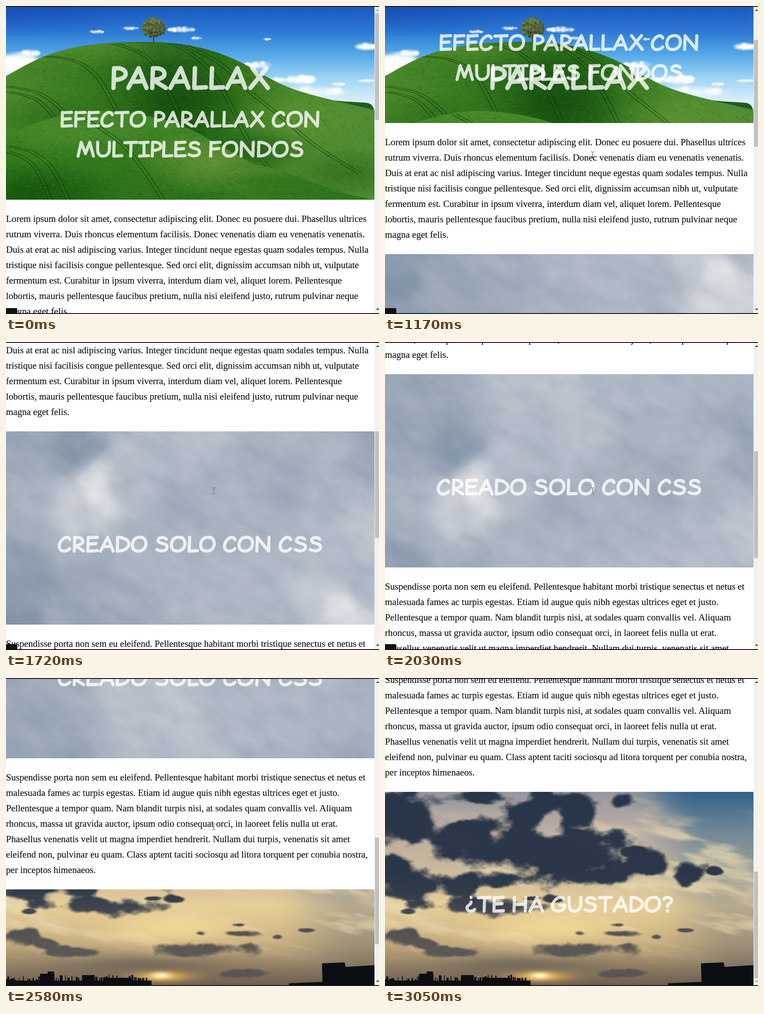
Recreate the animation shown at these times as an HTML page with a canvas. Size 825x679 px, loop 3910 ms.

```html
<!DOCTYPE html>
<html lang="es">
<head>
<meta charset="utf-8">
<title>Parallax</title>
<style>
html, body { margin: 0; width: 100%; height: 100%; overflow: hidden; background: #fff; }
canvas { position: absolute; left: 0; top: 0; }
#view { position: absolute; left: 0; top: 2px; width: 815px; height: 675px; overflow: hidden; }
#page { position: absolute; left: 0; top: -2px; }
p {
  position: absolute; left: 0; margin: 0; white-space: pre; color: #151515;
  font: 20.6px/34px "Liberation Serif", "Times New Roman", serif;
  -webkit-text-stroke: .2px #151515;
}
#tab { position: absolute; left: 0; top: 666px; width: 25px; height: 13px; background: #101113; border-radius: 0 3px 0 0; }
</style>
</head>
<body>
<canvas id="stage" width="825" height="679" aria-label="PARALLAX. EFECTO PARALLAX CON MULTIPLES FONDOS. CREADO SOLO CON CSS. ¿TE HA GUSTADO?"></canvas>
<div id="view"><div id="page">
<p style="top:452px">Lorem ipsum dolor sit amet, consectetur adipiscing elit. Donec eu posuere dui. Phasellus ultrices
rutrum viverra. Duis rhoncus elementum facilisis. Donec venenatis diam eu venenatis venenatis.
Duis at erat ac nisl adipiscing varius. Integer tincidunt neque egestas quam sodales tempus. Nulla
tristique nisi facilisis congue pellentesque. Sed orci elit, dignissim accumsan nibh ut, vulputate
fermentum est. Curabitur in ipsum viverra, interdum diam vel, aliquet lorem. Pellentesque
lobortis, mauris pellentesque faucibus pretium, nulla nisi eleifend justo, rutrum pulvinar neque
magna eget felis.</p>
<p style="top:1167px">Suspendisse porta non sem eu eleifend. Pellentesque habitant morbi tristique senectus et netus et
malesuada fames ac turpis egestas. Etiam id augue quis nibh egestas ultrices eget et justo.
Pellentesque a tempor quam. Nam blandit turpis nisi, at sodales quam convallis vel. Aliquam
rhoncus, massa ut gravida auctor, ipsum odio consequat orci, in laoreet felis nulla ut erat.
Phasellus venenatis velit ut magna imperdiet hendrerit. Nullam dui turpis, venenatis sit amet
eleifend non, pulvinar eu quam. Class aptent taciti sociosqu ad litora torquent per conubia nostra,
per inceptos himenaeos.</p>
</div></div>
<div id="tab"></div>
<script>
const W = 815, H = 679, LOOP = 3910;
const ctx = document.getElementById('stage').getContext('2d');
const page = document.getElementById('page');

// ---------- helpers ----------
let seed = 7;
const rnd = () => (seed = (seed * 16807) % 2147483647) / 2147483647;
const lerp = (a, b, k) => a + (b - a) * k;
const mix = (a, b, k) => a.map((v, i) => lerp(v, b[i], k));
const smooth = (a, b, v) => { const k = Math.min(1, Math.max(0, (v - a) / (b - a))); return k * k * (3 - 2 * k); };

function hash(x, y) {
  let n = Math.imul(x, 374761393) ^ Math.imul(y, 668265263);
  n = Math.imul(n ^ (n >>> 13), 1274126177);
  return ((n ^ (n >>> 16)) >>> 0) / 4294967296;
}
function noise(x, y) {
  const i = Math.floor(x), j = Math.floor(y), u = smooth(0, 1, x - i), v = smooth(0, 1, y - j);
  return lerp(lerp(hash(i, j), hash(i + 1, j), u), lerp(hash(i, j + 1), hash(i + 1, j + 1), u), v);
}
function fbm(x, y, n = 5) {
  let sum = 0, amp = .5;
  for (; n--; amp /= 2) { sum += amp * noise(x, y); x = x * 2 + 17; y = y * 2 + 31; }
  return sum;
}
function layer(w = W, h = H) {
  const c = document.createElement('canvas');
  c.width = w; c.height = h;
  return c;
}
// Builds a picture from a colour function, at half resolution
function field(shade) {
  const w = W + 1 >> 1, h = H + 1 >> 1, small = layer(w, h), sg = small.getContext('2d'), img = sg.createImageData(w, h);
  for (let y = 0, i = 0; y < h; y++) for (let x = 0; x < w; x++, i += 4) {
    const c = shade(x * 2, y * 2);
    for (let k = 0; k < 3; k++) img.data[i + k] = c[k];
    img.data[i + 3] = 255;
  }
  sg.putImageData(img, 0, 0);
  const big = layer(), g = big.getContext('2d');
  g.imageSmoothingQuality = 'high';
  g.drawImage(small, 0, 0, w * 2, h * 2);
  return big;
}
function curve(g, text) {
  const p = text.split(' ').map(s => s.split(',').map(Number));
  g.moveTo(...p[0]);
  for (let i = 1; i < p.length - 1; i++) {
    const last = i === p.length - 2, [x, y] = p[i], [u, v] = p[i + 1];
    g.quadraticCurveTo(x, y, last ? u : (x + u) / 2, last ? v : (y + v) / 2);
  }
}
// Soft elliptical spot; rgb as "r,g,b"
function spot(g, x, y, rx, ry, rgb, a) {
  g.save();
  g.translate(x, y);
  g.scale(rx, ry);
  const f = g.createRadialGradient(0, 0, 0, 0, 0, 1);
  f.addColorStop(0, `rgba(${rgb},${a})`);
  f.addColorStop(.5, `rgba(${rgb},${a * .55})`);
  f.addColorStop(1, `rgba(${rgb},0)`);
  g.fillStyle = f;
  g.fillRect(-1, -1, 2, 2);
  g.restore();
}
function ramp(g, x, y, stops) {
  const f = g.createLinearGradient(0, 0, x, y);
  stops.forEach(([k, c]) => f.addColorStop(k, c));
  return f;
}

// ---------- green hills ----------
function hills() {
  const c = layer(), g = c.getContext('2d');
  g.fillStyle = ramp(g, 0, 230, [[0, '#1a57bd'], [.25, '#2d7ad4'], [.47, '#56a9e8'], [.7, '#a0d6f5'], [.92, '#dceff8']]);
  g.fillRect(0, 0, W, H);
  spot(g, 0, 0, 330, 70, '20,70,170', .5);

  const puff = (x, y, w, h, n) => {
    spot(g, x, y, w, h, '255,255,255', .75);
    for (let i = 0; i < n; i++) {
      const u = rnd() * 2 - 1, r = h * (.35 + rnd() * .4);
      spot(g, x + u * w * .8, y + (rnd() - .6) * h * (1 - u * u), r * 1.4, r, '255,255,255', .8);
    }
  };
  puff(25, 125, 50, 28, 24); puff(55, 104, 20, 11, 10); puff(5, 140, 40, 20, 12);
  puff(201, 57, 18, 5, 8); puff(275, 49, 21, 5, 8); puff(388, 52, 36, 8, 16);
  puff(421, 71, 13, 5, 6); puff(577, 73, 10, 4, 6); puff(797, 89, 27, 11, 16);
  puff(650, 163, 34, 14, 22); puff(598, 164, 28, 9, 12); puff(560, 130, 34, 10, 12);
  puff(735, 172, 16, 6, 8); puff(797, 165, 22, 5, 10); puff(680, 190, 90, 16, 10);

  g.fillStyle = '#1f5c20';
  g.beginPath();
  curve(g, '690,204 738,210 780,212 815,215 815,240');
  g.lineTo(690, 240);
  g.fill();

  const mound = (top, fill, paint, lean) => {
    g.save();
    g.beginPath();
    curve(g, top);
    g.lineTo(W, 440); g.lineTo(0, 440); g.closePath();
    g.fillStyle = fill;
    g.fill();
    g.clip();
    paint();
    for (let i = 0; i < 8000; i++) {
      const x = rnd() * W, y = 75 + rnd() * 360, l = 3 + rnd() * 7, s = lean(x);
      g.strokeStyle = i & 1 ? 'rgba(0,35,0,.14)' : 'rgba(190,220,100,.09)';
      g.beginPath(); g.moveTo(x, y); g.lineTo(x + l, y + l * s); g.stroke();
    }
    g.restore();
  };
  const track = (...lines) => lines.forEach(t => {
    for (const [dx, col, w] of [[0, 'rgba(10,50,8,.75)', 1.5], [8, 'rgba(10,50,8,.65)', 1.3], [2, 'rgba(150,190,90,.25)', 1]]) {
      g.save();
      g.translate(dx, -dx * .2);
      g.strokeStyle = col; g.lineWidth = w;
      g.beginPath(); curve(g, t); g.stroke();
      g.restore();
    }
  });

  mound('0,155 55,122 125,96 205,82 300,78 385,82 455,97 520,123 570,153 630,183 710,205 815,229 815,229',
    ramp(g, W, 0, [[0, '#4c8a2c'], [.22, '#37791f'], [.42, '#1e5c14'], [.58, '#296c19'], [.78, '#4d8a2c'], [1, '#518d33']]),
    () => {
      spot(g, 210, 90, 260, 50, '105,160,60', .45);
      spot(g, 400, 210, 130, 100, '15,70,10', .6);
      spot(g, 90, 250, 160, 60, '30,100,20', .5);
      spot(g, 640, 250, 150, 60, '110,160,60', .35);
      spot(g, 560, 320, 130, 50, '25,85,15', .6);
      spot(g, 760, 370, 150, 60, '35,100,22', .6);
      track('82,112 140,114 195,148 225,200 250,250', '235,84 300,100 340,150 385,250', '362,82 430,115 480,190 545,330 600,380',
        '385,84 470,120 520,180 600,240 690,320 780,370', '0,178 50,184 100,208 140,250', '0,190 40,196 80,215 110,255');
    }, x => (x - 300) / 600);

  mound('0,287 50,262 130,238 210,229 300,238 390,262 470,305 540,345 610,378 700,402 815,428 815,428',
    ramp(g, 0, 430, [[.53, '#478a2a'], [.75, '#357c1e'], [1, '#27701a']]),
    () => {
      spot(g, 60, 410, 200, 70, '12,75,8', .7);
      spot(g, 450, 345, 170, 75, '130,160,68', .6);
      spot(g, 160, 285, 170, 40, '95,150,55', .4);
      spot(g, 290, 400, 130, 60, '50,115,28', .5);
      track('0,310 45,315 90,345 115,385 135,430', '0,322 30,330 70,360 95,430', '150,240 220,275 290,340 345,430');
    }, x => (x - 200) / 500);

  mound('455,440 475,345 545,346 620,366 700,398 815,432 815,432',
    ramp(g, W, 0, [[.55, 'rgba(75,130,45,0)'], [.68, 'rgba(52,120,30,.95)'], [1, '#2c741d']]),
    () => spot(g, 560, 360, 120, 24, '120,160,65', .35), () => .4);

  // Tree
  g.fillStyle = '#4b4a35';
  g.fillRect(325, 60, 3, 20);
  for (let i = 0; i < 520; i++) {
    const a = rnd() * 6.283, r = Math.sqrt(rnd()), x = Math.cos(a) * r, y = Math.sin(a) * r;
    const l = 62 + rnd() * 60 - x * 8 - y * 18;
    g.fillStyle = `rgb(${l * .95},${l * 1.12},${l * .62})`;
    g.beginPath();
    g.arc(326 + x * (25 + y * 4), 47 + y * 21, 1 + rnd() * 1.8, 0, 7);
    g.fill();
  }
  return c;
}

// ---------- storm clouds: x, y, brightness ----------
const tones = [
  0, 20, .28, 120, 60, .3, 260, 30, .55, 370, 80, .6, 480, 60, .45, 620, 50, .42, 780, 60, .4,
  60, 150, .2, 140, 220, .05, 20, 300, .3, 240, 130, .5, 330, 200, .45, 440, 190, .52, 560, 220, .33,
  680, 240, .38, 790, 230, .22, 70, 380, .4, 215, 325, .92, 170, 380, .7, 290, 280, .48, 400, 370, .3,
  520, 330, .36, 620, 320, .25, 720, 350, .4, 800, 420, .65, 40, 500, .08, 180, 480, .25, 260, 440, .38,
  420, 480, .42, 560, 470, .42, 740, 480, .5, 790, 540, .45, 10, 620, 0, 120, 600, .25, 300, 600, .3,
  430, 560, .42, 590, 640, .4, 660, 600, .62, 750, 600, .95, 720, 650, .8, 100, 670, .15, 400, 670, .35
];
function storm(x, y) {
  const n = fbm(x / 130, y / 110), m = fbm(x / 120 + 40, y / 120 + 9);
  const px = x + (n - .5) * 110, py = y + (m - .5) * 110;
  let sum = 0, total = 0;
  for (let i = 0; i < tones.length; i += 3) {
    const d = (px - tones[i]) ** 2 + (py - tones[i + 1]) ** 2 + 900, w = 1 / (d * d);
    sum += w * tones[i + 2];
    total += w;
  }
  const grain = fbm((x + y * .5) / 60, (y - x * .5) / 34, 4) - .47;
  return mix([134, 150, 170], [225, 226, 229], sum / total + grain * .3);
}

// ---------- sunset: x, y, rx, ry of dark clouds ----------
const banks = [
  25, 300, 120, 60, 330, 385, 200, 62, 200, 345, 110, 42, 420, 285, 60, 45, 325, 290, 60, 52, 200, 262, 70, 18,
  520, 270, 28, 20, 580, 408, 54, 32, 550, 383, 36, 14, 672, 427, 40, 24, 80, 455, 150, 32, 15, 420, 50, 30,
  210, 500, 150, 22, 50, 515, 20, 8, 25, 565, 44, 24, 145, 601, 60, 14, 92, 585, 28, 14, 445, 597, 120, 20,
  430, 562, 22, 8, 515, 563, 50, 9, 515, 543, 18, 6, 480, 440, 90, 24, 250, 440, 100, 24, 372, 487, 28, 9,
  320, 485, 26, 6, 665, 555, 18, 4, 525, 650, 46, 9, 600, 570, 12, 6, 725, 425, 18, 10
];
const west = [[150, 150, 158], [188, 174, 162], [200, 184, 156], [230, 206, 152], [190, 166, 124], [112, 98, 82]];
const east = [[52, 98, 140], [112, 135, 150], [150, 156, 150], [182, 170, 142], [158, 144, 118], [105, 96, 84]];
function sunset(x, y) {
  if (y < 240) return [40, 55, 75];
  const k = Math.min(4.999, Math.max(0, (y - 251) / 84)), i = Math.floor(k);
  const at = r => mix(r[i], r[i + 1], k - i);
  let c = mix(at(west), at(east), smooth(520, 700, x + (y - 300) * -.3));
  const n = fbm(x / 60, y / 38, 6) - .49;
  const wisp = fbm((x + y * .8) / 150, (y - x * .25) / 26, 5);
  c = mix(c, [232, 214, 174], smooth(.46, .72, wisp) * .75 * smooth(280, 350, y) * smooth(640, 520, y));
  c = mix(c, [205, 190, 170], Math.exp(-(((x - 555) / 50) ** 2 + ((y - 300) / 70) ** 2)) * smooth(.3, .6, wisp));
  c = mix(c, [250, 224, 152], .75 * Math.exp(-(((x - 370) / 170) ** 2 + ((y - 552) / 34) ** 2)));
  c = mix(c, [95, 88, 82], .55 * Math.exp(-(((x - 300) / 170) ** 2 + ((y - 632) / 20) ** 2)));
  let d = -2;
  for (let j = 0; j < banks.length; j += 4)
    d = Math.max(d, 1 - Math.hypot((x - banks[j]) / banks[j + 2], (y - banks[j + 1]) / banks[j + 3]));
  const ink = mix([35, 48, 68], [88, 84, 82], smooth(430, 610, y));
  c = mix(c, ink, smooth(-.08, .4, d + n * 1.9) * .95);
  const sun = Math.hypot((x - 342) / 62, (y - 657) / 11);
  c = mix(c, [250, 190, 80], Math.exp(-sun * sun) * .9);
  return mix(c, [255, 250, 205], Math.exp(-(((x - 342) / 20) ** 2 + ((y - 655) / 7) ** 2)));
}
function skyline(c) {
  const g = c.getContext('2d');
  g.fillStyle = '#0c0e11';
  g.fillRect(0, 667, 322, 12);
  g.fillRect(75, 652, 32, 20); g.fillRect(92, 647, 14, 10);
  g.fillRect(168, 655, 28, 20); g.fillRect(215, 661, 62, 12);
  for (let x = 0; x < 318; x += 3 + rnd() * 7) {
    const h = 3 + rnd() * 12 * (x > 60 && x < 280 ? 1 : .7);
    g.fillRect(x, 668 - h, 1.2 + rnd() * 4, h + 4);
  }
  g.beginPath();
  for (const [x, y] of [[625, 679], [626, 673], [700, 670], [699, 629], [749, 627], [751, 637], [815, 633], [815, 679]]) g.lineTo(x, y);
  g.fill();
  return c;
}

// ---------- hand lettering: advance and pen path on a 30.5-unit cap height ----------
const stem = 'M6 0L5 30.5', bow = 'M6 1C16-2 24 3 24 9C24 15 15 18 6 18', arms = stem + 'M6 1L26 0M6 15L23 14';
const pens = {
  A: [35, 'M3 30.5L19 0L31 30.5M9 21L27 20'],
  E: [30, arms + 'M5 30.5L26 29.5'],
  F: [29, arms],
  H: [37, stem + 'M31 0L30 30.5M6 16L30 15'],
  I: [26.3, 'M4 1L22 0M13 1L13 30M3 30.5L23 29.5'],
  L: [26.4, stem + 'L23 29.5'],
  M: [42.4, 'M4 30.5L11 0L20.5 25L30 0L38 30.5'],
  N: [38.3, 'M5 30.5L6 0L31 30.5L32 0'],
  T: [32.6, 'M3 1L30 0M17 1L16 30.5'],
  X: [34.7, 'M29 0L4 30.5M7 0L31 30.5'],
  ' ': [14.4, '']
};
Object.assign(pens, {
  C: [32, 'M27 5C25-1 18-1 13 3C5 9 2 18 5 25C9 33 20 32 27 25'],
  D: [34.7, stem + 'M6 0C20 0 31 7 31 15C30 26 16 30.5 5 30.5'],
  G: [35.5, 'M29 4C25-1 18-1 13 3C5 9 2 18 5 25C10 33 32 33 31 17L20 17'],
  O: [38.4, 'M22 0C9-1 4 9 4 18C4 27 10 30.5 17 30.5C28 30.5 34 22 34 14C34 6 30 0 22 0Z'],
  P: [25, stem + bow],
  R: [30, stem + bow + 'L26 30.5'],
  S: [33.3, 'M26 4C22-1 8-1 8 7C8 15 28 12 28 21C28 31 14 32 5 27'],
  U: [35.5, 'M5 0L5 16C5 26 10 30.5 16 30.5C25 30.5 31 25 31 14L31 0'],
  '?': [25, 'M5 4C9-2 22-1 22 7C22 14 13 13 13 20M13 30L13 30.5']
});
pens['¿'] = pens['?'];
for (const k in pens) pens[k][2] = new Path2D(pens[k][1]);

function title(text, y, size = 1) {
  const wide = [...text].reduce((s, ch) => s + pens[ch][0], 0);
  ctx.save();
  ctx.translate(407.5 - wide * size / 2, y);
  ctx.scale(size, size);
  ctx.lineWidth = 6.8;
  ctx.lineCap = ctx.lineJoin = 'round';
  ctx.strokeStyle = 'rgba(255,255,255,.8)';
  for (const ch of text) {
    const [step, , path] = pens[ch];
    ctx.save();
    if (ch === '¿') { ctx.translate(25, 30.5); ctx.rotate(Math.PI); }
    ctx.stroke(path);
    ctx.restore();
    ctx.translate(step, 0);
  }
  ctx.restore();
}

// ---------- scrolling ----------
const knots = [[690, 0], [770, 13], [1170, 169], [1720, 519], [2350, 781], [2730, 1071], [3050, 1180]];
const bursts = [[770, 80], [1320, 80], [1870, 80], [2430, 75], [2980, 70]];
const slope = i => (knots[i + 1][1] - knots[i][1]) / (knots[i + 1][0] - knots[i][0]);
function tangent(i) {
  if (i === 0 || i === knots.length - 1) return 0;
  const a = slope(i - 1), b = slope(i);
  return 2 * a * b / (a + b);
}
function scrollAt(t) {
  if (t < 770) return 0;
  if (t >= 3050) return 1180;
  const [start, step] = bursts.filter(b => b[0] <= t).pop();
  t = start + Math.min(6, Math.floor((t - start) / step)) * step;
  let i = 0;
  while (t >= knots[i + 1][0]) i++;
  const [t0, a] = knots[i], [t1, b] = knots[i + 1], w = t1 - t0, k = (t - t0) / w, q = 1 - k;
  return Math.round(a * (1 + 2 * k) * q * q + b * k * k * (3 - 2 * k) + w * k * q * (tangent(i) * q - tangent(i + 1) * k));
}

// ---------- drawing ----------
const pics = [hills(), field(storm), skyline(field(sunset))];
const sections = [
  [0, 427, s => {
    title('PARALLAX', 137, 1.43);
    title('EFECTO PARALLAX CON', 234.4 - s);
    title('MULTIPLES FONDOS', 300.4 - s);
  }],
  [716, 1142, s => title('CREADO SOLO CON CSS', 949.5 - s)],
  [1431, 1857, s => title('¿TE HA GUSTADO?', 1663.5 - s)]
];
function arrow(y, dir, on) {
  ctx.fillStyle = on ? '#505050' : '#a3a3a3';
  ctx.beginPath();
  ctx.moveTo(818, y + 2 * dir); ctx.lineTo(822, y - 2 * dir); ctx.lineTo(826, y + 2 * dir);
  ctx.fill();
}
function draw(s) {
  ctx.fillStyle = '#fff';
  ctx.fillRect(0, 0, 825, H);
  sections.forEach(([top, end, write], i) => {
    if (end <= s || top - s > H) return;
    ctx.save();
    ctx.beginPath();
    ctx.rect(0, top - s, W, end - top);
    ctx.clip();
    ctx.drawImage(pics[i], 0, 0);
    write(s);
    ctx.restore();
  });
  // I-beam pointer
  ctx.globalCompositeOperation = 'difference';
  ctx.fillStyle = 'rgba(255,255,255,.75)';
  ctx.fillRect(459, 322, 1, 12);
  for (const y of [321, 334]) { ctx.fillRect(456, y, 3, 1); ctx.fillRect(460, y, 3, 1); }
  ctx.globalCompositeOperation = 'source-over';

  ctx.fillStyle = '#f1f1f1';
  ctx.fillRect(815, 0, 10, H);
  ctx.fillStyle = '#c1c1c1';
  ctx.fillRect(816, Math.round(16 + s * .3485), 9, 235);
  arrow(9, 1, s > 0);
  arrow(669, -1, s < 1180);
  ctx.fillStyle = '#1e2026';
  ctx.fillRect(0, 0, 825, 2);
  ctx.fillRect(0, 677, 825, 2);
  page.style.transform = `translateY(${-s}px)`;
}
const begin = performance.now();
function tick() {
  draw(scrollAt((performance.now() - begin) % LOOP));
  requestAnimationFrame(tick);
}
tick();
</script>
</body>
</html>
```
